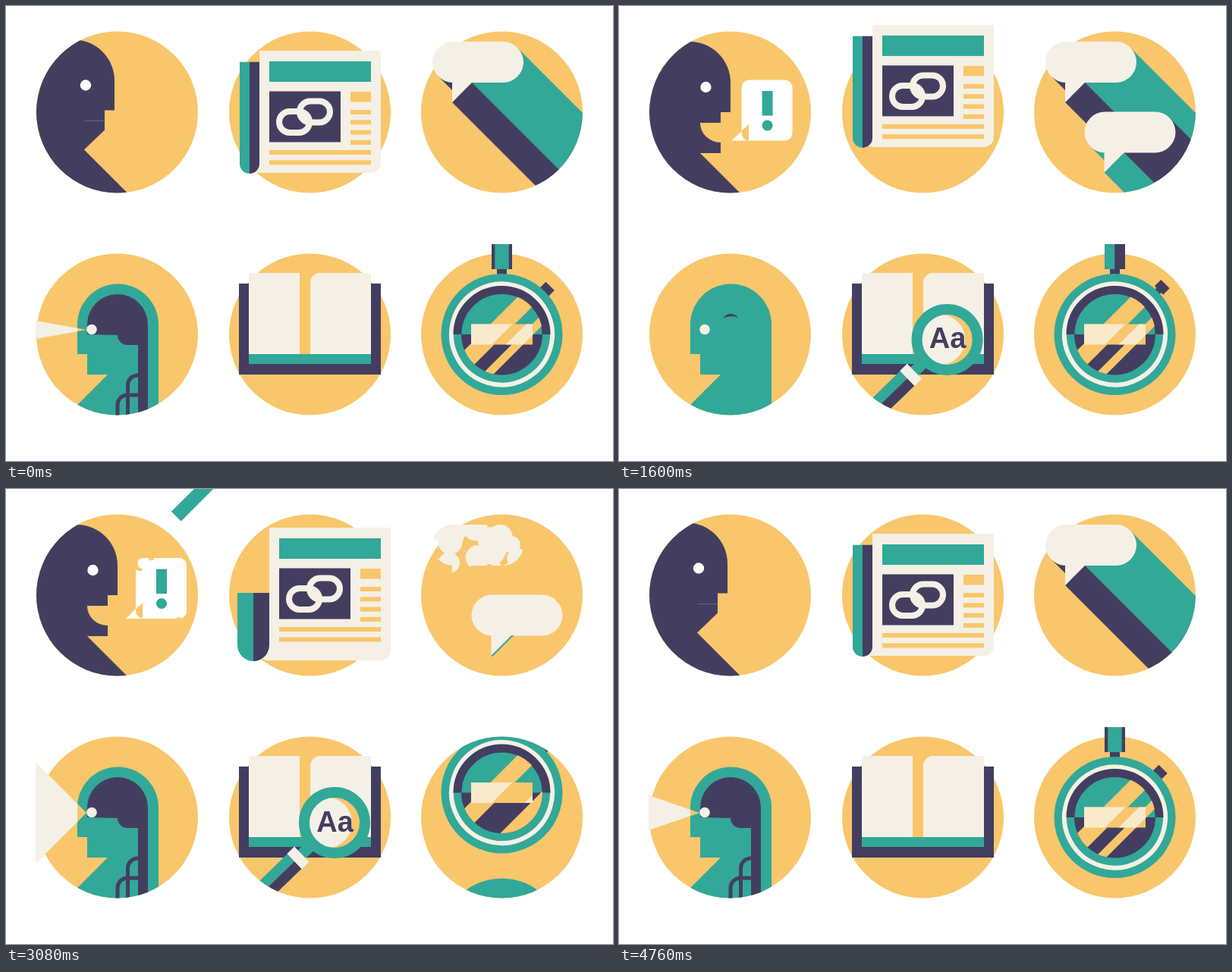
Recreate the animation shown at these times as an HTML page with a canvas. Size 800 by 600 pixels, loop 4.8 s.

```html
<!DOCTYPE html>
<html lang="en">
<head>
<meta charset="utf-8">
<title>Six icons</title>
<style>
html, body { margin: 0; width: 100%; height: 100%; overflow: hidden; background: #fff; }
canvas { display: block; width: 800px; height: 600px; }
</style>
</head>
<body>
<canvas id="stage" width="800" height="600"></canvas>
<script>
const LOOP = 4800, STEP = 40, TAU = Math.PI * 2, RADIUS = 106.5;
const YELLOW = '#f9c66b', NAVY = '#433e60', TEAL = '#32a898', CREAM = '#f5f0e5', PALE = '#f8eacb', WHITE = '#fff';
const c = document.getElementById('stage').getContext('2d');

const clamp = v => Math.min(1, Math.max(0, v));
const mix = (a, b, u) => a + (b - a) * u;

// Progress 0..1 from time a to b: even, eased, and eased there and back.
const part = (t, a, b) => clamp((t - a) / (b - a));
const ramp = (t, a, b) => { const u = part(t, a, b); return u * u * (3 - 2 * u); };
const between = (t, a, b, back, end) => ramp(t, a, b) - ramp(t, back, end);

function seeded(seed) {
  return () => (seed = (seed * 16807) % 2147483647) / 2147483647;
}

function rect(x, y, w, h, color) {
  c.fillStyle = color;
  c.fillRect(x, y, w, h);
}

function round(x, y, w, h, r, color) {
  c.beginPath();
  c.roundRect(x, y, w, h, r);
  c.fillStyle = color;
  c.fill();
}

function disc(x, y, r, color, ry = r) {
  if (r <= 0) return;
  c.beginPath();
  c.ellipse(x, y, r, ry, 0, 0, TAU);
  c.fillStyle = color;
  c.fill();
}

function poly(color, ...pts) {
  c.beginPath();
  pts.forEach(p => c.lineTo(p[0], p[1]));
  c.fillStyle = color;
  c.fill();
}

function ring(x, y, r, width, color, a0 = 0, a1 = TAU) {
  c.beginPath();
  c.arc(x, y, r, a0, a1);
  c.lineWidth = width;
  c.strokeStyle = color;
  c.stroke();
}

function layer(draw) {
  c.save();
  draw();
  c.restore();
}

function scaled(x, y, size, draw) {
  if (size <= 0) return;
  layer(() => {
    c.translate(x, y);
    c.scale(size, size);
    c.translate(-x, -y);
    draw();
  });
}

function inCircle(x, y, r, draw) {
  layer(() => {
    c.beginPath();
    c.arc(x, y, r, 0, TAU);
    c.clip();
    draw();
  });
}

// Breaks a shape into shrinking dots; those near the edge go first. `age` runs 0..1.
function dissolve(age, x, y, w, h, seed, color, shape) {
  const rnd = seeded(seed);
  layer(() => {
    shape();
    c.clip();
    for (let i = 0; i < 80; i++) {
      const dx = rnd() - 0.5, dy = rnd() - 0.5;
      const edge = 2 * Math.max(Math.abs(dx), Math.abs(dy));
      const end = 0.3 + 0.7 * rnd() ** 2 * (1 - 0.4 * edge ** 2);
      disc(x + w * dx, y + h * dy, 16 * clamp((end - age) * 3), color);
    }
  });
}

// ---- talking head ----
function profile(R, dy, open, blink) {
  layer(() => {
    c.translate(R, dy);
    c.beginPath();
    c.moveTo(-108, 260);
    c.lineTo(-108, 101);
    c.arc(-54, 101, 54, Math.PI, 0);
    c.lineTo(0, 140);
    c.lineTo(-13, 140);
    c.lineTo(-13, 154);
    c.lineTo(-40, 154);
    c.ellipse(-13, 154, 27, 26 * open, 0, Math.PI, Math.PI / 2, true);
    c.lineTo(-13, 166 + 28 * open);
    c.lineTo(-40, 192 + 2 * open);
    c.lineTo(28 - 2 * open, 260);
    c.fillStyle = NAVY;
    c.fill();
    if (open < 0.05) rect(-40, 153.5, 27, 0.7, '#77708a');
    disc(-38 + 5.5 * open, 107, 7.2, WHITE, 7.2 * blink);
  });
}

function arrow(x, y, len) {
  layer(() => {
    c.translate(x, y);
    c.rotate(-Math.PI / 4);
    rect(-len, -9, len - 18, 18, TEAL);
    poly(TEAL, [0, 0], [-19, -19], [-19, 19]);
  });
}

function speechShape(x, y) {
  c.beginPath();
  c.roundRect(x - 33.5, y - 40, 67, 80, 10);
  c.moveTo(x - 46.5, y + 40);
  c.lineTo(x - 24, y + 40);
  c.lineTo(x - 24, y + 18);
  c.closePath();
}

function talker(t) {
  const settle = between(t, 400, 1680, 4280, 4680);
  const visit = between(t, 3960, 4280, 4280, 4680);
  const open = between(t, 480, 720, 3760, 3920);
  const blink = 1 - 0.45 * between(t, 2180, 2280, 2280, 2380);
  const x = 191.5 + 13 * part(t, 1040, 3080), y = 140 - 11 * part(t, 1040, 3560);
  inCircle(146.5, 140, RADIUS, () => {
    profile(143 + 4 * settle + 64 * visit, -2.5 * (1 - settle), open, blink);
    const d = (t - 1040) * 0.45;
    if (t > 880 && t < 1360) arrow(210 + d, 183 - d, 150);
  });
  if (t >= 3040 && t <= 3160) {
    const d = (t - 3080) * 1.1;
    arrow(324 + d, -63.5 - d, 141);
  }
  if (t < 2840) scaled(x - 46, y + 40, ramp(t, 640, 880), () => {
    speechShape(x, y);
    c.fillStyle = WHITE;
    c.fill();
  });
  else dissolve((t - 2840) / 1000, x, y, 68, 80, 71, WHITE, () => speechShape(x, y));
  scaled(x, y, between(t, 760, 920, 3720, 3920), () => {
    rect(x - 6.5, y - 25.5, 14, 32.5, TEAL);
    disc(x + 0.5, y + 20, 7, TEAL);
  });
}

// ---- newspaper ----
function link(x, y) {
  c.beginPath();
  c.roundRect(x - 20, y - 14, 40, 28, 14);
  c.lineWidth = 8;
  c.strokeStyle = CREAM;
  c.stroke();
}

function newspaper(t) {
  const roll = between(t, 2280, 2800, 4240, 4720);
  const short = between(t, 2080, 2280, 2280, 2480);
  const top = 59 - 36.5 * ramp(t, 0, 1040) + 70.5 * ramp(t, 1520, 2240)
    - 42 * ramp(t, 2320, 2840) + 8 * ramp(t, 4240, 4720);
  const x = 334 + 13 * roll + short, foldW = mix(26, 42, roll), h = mix(161, 175, roll);
  const foldTop = top + mix(14.5, 86, roll) + 4 * short;
  round(x - foldW / 2, top + h - 40, foldW, 40, [0, 0, 0, foldW / 2], CREAM);
  round(x, top, 160, h, [0, 0, 13, 0], CREAM);
  layer(() => {
    const r = foldW / 2, left = x - foldW;
    c.beginPath();
    c.roundRect(left, foldTop, foldW, top + h + 1 - foldTop, [0, 0, r, r]);
    c.clip();
    rect(left, foldTop, r, 300, TEAL);
    rect(left + r, foldTop, r, 300, NAVY);
  });
  const px = x + 13;
  rect(px, top + 14, 134, 27, TEAL);
  rect(px, top + 53.5, 94, 67, NAVY);
  link(x + 46, top + 94);
  link(x + 73, top + 80.5);
  rect(x + 120, top + 54, 27, 13.5, YELLOW);
  for (let i = 0; i < 4; i++) rect(x + 120, top + 78 + 13.3 * i, 27 - short, 6, YELLOW);
  for (let i = 0; i < 2; i++) rect(px, top + 131 + 13.4 * i, 134 - (4 + 3 * i) * short, 6, YELLOW);
}

// ---- chat bubbles ----
function chatShape(x, y) {
  c.beginPath();
  c.roundRect(x, y, 120, 54, 27);
  c.moveTo(x + 26, y + 80);
  c.lineTo(x + 26, y + 48);
  c.lineTo(x + 58, y + 48);
  c.closePath();
}

function chat(x, y, size) {
  scaled(x + 26, y + 80, size, () => {
    chatShape(x, y);
    c.fillStyle = CREAM;
    c.fill();
  });
}

function longShadow(x, y, len, upper, lower) {
  if (len < 0.5) return;
  const sweep = (p, q, color) => poly(color,
    [x + p[0], y + p[1]], [x + p[0] + len, y + p[1] + len],
    [x + q[0] + len, y + q[1] + len], [x + q[0], y + q[1]]);
  const inner = [52, 54];
  sweep([112, 8], inner, upper);
  sweep([8, 46], inner, lower);
  sweep([26, 80], inner, lower);
}

function chats(t) {
  const drift = 1.2 * between(t, 3480, 3880, 4280, 4720);
  const x1 = 562 + drift, y1 = 47 + drift, x2 = 613.5, y2 = 139.5;
  inCircle(653.5, 140, RADIUS, () => {
    longShadow(x1, y1, 200 * (1 - between(t, 1640, 2280, 3960, 4240)), TEAL, NAVY);
    longShadow(x2, y2, 200 * between(t, 680, 1000, 2360, 3120), NAVY, TEAL);
  });
  if (t < 2640) chat(x1, y1, 1);
  else dissolve((t - 2640) / 1000, x1 + 60, y1 + 30, 120, 64, 37, CREAM, () => chatShape(x1, y1));
  chat(x1, y1, ramp(t, 3880, 4120));
  if (t < 3480) chat(x2, y2, ramp(t, 400, 720));
  else dissolve((t - 3480) / 900, x2 + 60, y2 + 32, 120, 68, 913, CREAM, () => chatShape(x2, y2));
}

// ---- looking head ----
function faceShape() {
  c.beginPath();
  c.moveTo(94, 459);
  c.lineTo(94, 420);
  c.arc(147.5, 420, 53.5, Math.PI, 0);
  c.lineTo(201, 560);
  c.lineTo(94, 560);
  c.lineTo(94, 526);
  c.lineTo(134, 486);
  c.lineTo(107, 486);
  c.lineTo(107, 459);
  c.closePath();
}

function watcher(t) {
  const late = t < 80 ? t + LOOP : t;
  const reach = 67 * part(late, 2080, 2332);
  const half = reach - 67 * part(late, 4600, 4844);
  const cone = color => poly(color, [106, 427], [106 - reach, 427 - half], [106 - reach, 427 + half]);
  cone(CREAM);
  inCircle(146.5, 433, RADIUS, () => {
    faceShape();
    c.fillStyle = TEAL;
    c.fill();
    hair(1 - between(t, 400, 1440, 1440, 1880));
    braids(1 - between(t, 160, 560, 1800, 2160));
    faceShape();
    c.clip();
    cone(YELLOW);
  });
  disc(113, 426.5, 6.8, CREAM);
}

function hair(size) {
  scaled(147.5, 417, size, () => {
    c.beginPath();
    c.moveTo(107, 433);
    c.lineTo(107, 420);
    c.arc(147, 420, 40, Math.PI, 0);
    c.lineTo(187, 447);
    c.lineTo(160, 447);
    c.arc(160, 434, 13, Math.PI / 2, Math.PI);
    c.fillStyle = NAVY;
    c.fill();
    const cover = clamp((0.8 - size) * 2.5);
    disc(150, 433, 60 * cover, TEAL, 42 * cover);
  });
}

function braids(grown) {
  if (grown <= 0) return;
  layer(() => {
    c.beginPath();
    c.rect(130, 440, 70, 7 + 95 * grown);
    c.clip();
    rect(174, 440, 13, 110, NAVY);
    c.beginPath();
    for (let i = 0; i < 2; i++) {
      const x = 160.5 - 13.5 * i, y = 487 + 26 * i;
      c.moveTo(x, 550);
      c.lineTo(x, y + 13);
      c.arc(x + 13, y + 13, 13, Math.PI, Math.PI * 1.5);
      c.lineTo(176, y);
    }
    c.lineWidth = 5;
    c.strokeStyle = NAVY;
    c.stroke();
  });
}

// ---- book and magnifier ----
function book(t) {
  const s = 41 * between(t, 3480, 3960, 4000, 4490);
  const left = 320 + 0.63 * s, right = 401 - s, coverL = 307 + 0.81 * s;
  const drop = Math.min(14, 0.43 * s), top = 352 + drop;
  rect(coverL, 366, 494 - s - coverL, 120, NAVY);
  rect(left, 459 + drop, right + 80 - left, 13 - 0.25 * s, TEAL);
  rect(left, 366, right + 10 - left, 93 + drop, YELLOW);
  rect(left, top, 67 - 1.31 * s, 107, CREAM);
  round(right, top, 80, 107, [13 - 0.2 * s, 0, 0, 0], CREAM);
  inCircle(400.5, 433, RADIUS, () => magnifier(t));
}

function magnifier(t) {
  const enter = ramp(t, 480, 960), shift = ramp(t, 1120, 1640), leave = ramp(t, 3280, 4090);
  const x = 335 + 73.5 * enter + 24.5 * shift + 74 * leave;
  const y = 640 - 207 * enter + 7 * shift + 170 * leave;
  layer(() => {
    c.translate(x, y);
    c.rotate((110 + 15 * enter + 11 * shift + 50 * leave) * Math.PI / 180);
    rect(40, -7.5, 24, 15, TEAL);
    rect(73, 0, 150, 13.5, TEAL);
    rect(73, -13.5, 150, 13.5, NAVY);
    rect(60, -14, 13.5, 28, CREAM);
  });
  inCircle(x, y, 35, () => {
    rect(x - 40, y - 40, 80, 80, YELLOW);
    disc(x + 20.5 - 31 * shift - 60 * ramp(t, 3240, 3520), y, 33.5, CREAM);
    c.globalAlpha = between(t, 1280, 1560, 3240, 3440);
    c.font = 'bold 38px "Liberation Sans", Arial, sans-serif';
    c.textAlign = 'center';
    c.fillStyle = NAVY;
    c.fillText('Aa', x + 0.5, y + 11.5);
  });
  ring(x, y, 40, 14, TEAL);
}

// ---- stopwatch ----
function dial(y, sweep, grow, tilt, shift) {
  const x = 653.5;
  disc(x, y, 80, TEAL);
  if (sweep <= 0) return;
  ring(x, y, 66.5, 6, CREAM, 1.07, 1.07 + TAU * sweep);
  ring(x, y, 58.5, 11, NAVY, Math.PI, Math.PI + Math.PI * clamp(grow * 5));
  inCircle(x, y, 53.5, () => {
    layer(() => {
      c.translate(x, y);
      c.rotate(tilt);
      rect(-60, 0, 120, 60 * clamp(grow * 5), NAVY);
    });
    stripe(y, 1058, 1058 + 32 * grow, YELLOW);
    stripe(y, 1113 + shift, 1128 + shift * 1.5, YELLOW);
  });
  layer(() => {
    const w = 81 * Math.sqrt(grow), h = 27 * grow ** 1.4;
    c.beginPath();
    c.rect(x - w / 2, y - h / 2, w, h);
    c.clip();
    rect(x - 41, y - 14, 82, 28, YELLOW);
    stripe(y, 1030, 1087, PALE);
    stripe(y, 1105 + shift, 1128 + shift, PALE);
  });
}

// Diagonal band between two values of x + y, measured with the dial at rest.
function stripe(y, from, to, color) {
  const a = from + y - 433, b = to + y - 433, y0 = y - 90, y1 = y + 90;
  poly(color, [a - y0, y0], [b - y0, y0], [b - y1, y1], [a - y1, y1]);
}

function button(y, push) {
  layer(() => {
    c.translate(653.5, y);
    c.rotate(-Math.PI / 4);
    rect(74, -4.5, 12 - push, 9, NAVY);
    rect(82 - push, -8, 12, 16, NAVY);
  });
}

function crown(y, spin) {
  const x = 653.5, a = x + 13.5 * Math.sin(spin - 0.75), b = x + 13.5 * Math.sin(spin + 0.75);
  rect(647, y + 33, 13, 8, NAVY);
  rect(640, y, 27, 33, NAVY);
  rect(a, y, b - a, 33, TEAL);
}

function stopwatch(t) {
  const spin = 0.8 * ramp(t, 80, 560) - 1.6 * ramp(t, 1120, 1640) + 0.8 * ramp(t, 4280, 4680);
  const push = 4 * (1 - between(t, 0, 120, 4560, 4720));
  const scroll = 193 * ramp(t, 2960, 3420);
  if (t <= 2960) {
    crown(314, spin);
    button(433, push);
    dial(433, 1, 1, 0, 0);
    return;
  }
  inCircle(653.5, 433, RADIUS, () => {
    button(433 - scroll, 0);
    dial(433 - scroll, 1, 1, 0, 25 * part(t, 2960, 3080));
  });
  const rise = ramp(t, 3720, 4080);
  if (rise > 0) {
    crown(mix(354, 314, rise), spin);
    button(433, mix(20, push, rise));
  }
  inCircle(653.5, 433, RADIUS, () => dial(626 - scroll, ramp(t, 3360, 3660), ramp(t, 3400, 3960),
    0.2 * (1 - ramp(t, 3400, 3700)), 25 * (1 - ramp(t, 3560, 3960))));
}

function draw(now) {
  const t = Math.floor((now % LOOP) / STEP) * STEP;
  rect(0, 0, 800, 600, WHITE);
  for (const x of [146.5, 400.5, 653.5]) for (const y of [140, 433]) disc(x, y, RADIUS, YELLOW);
  [newspaper, talker, chats, watcher, book, stopwatch].forEach(icon => icon(t));
}

let begin;
function tick(now) {
  begin ??= now;
  draw(now - begin);
  requestAnimationFrame(tick);
}
draw(0);
requestAnimationFrame(tick);
</script>
</body>
</html>
```
